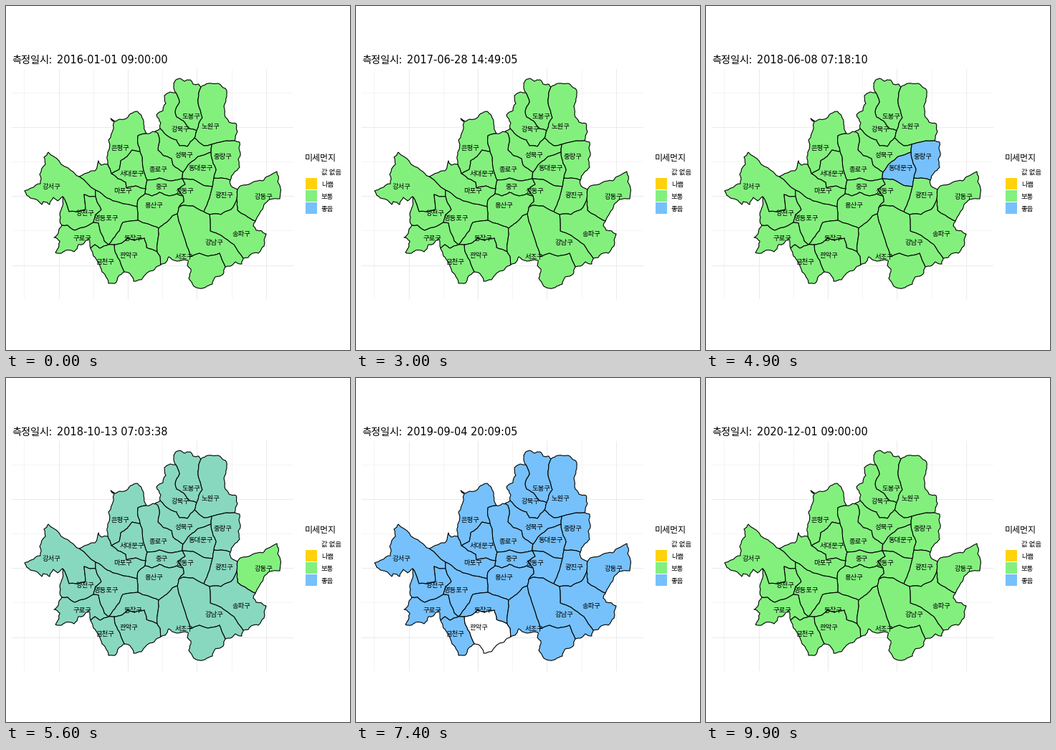
Recreate the animation shown at these times as a matplotlib script. Size 480 px wide and 480 px high, loop 10 s.

```python
import matplotlib.pyplot as plt
import numpy as np
from matplotlib.animation import FuncAnimation
from matplotlib.patches import Polygon, Rectangle

FRAMES, STEP_MS = 100, 100
PX = 0.72  # points per pixel at 100 dpi
KOREAN = "Noto Sans CJK JP"

NONE, BAD, FAIR, GOOD = "#FFFFFF", "#FFD20C", "#83F07E", "#76C1FB"

plt.rcParams["font.family"] = [KOREAN, "DejaVu Sans"]
rng = np.random.default_rng(25)


# ---- borders, each drawn once and shared by its two districts ----

edges = {}


def edge(name, *xy, rough=0.07):
    pts = np.array(xy, float).reshape(-1, 2)
    for _ in range(2):
        seg = np.diff(pts, axis=0)
        normal = np.column_stack([-seg[:, 1], seg[:, 0]])
        mid = pts[:-1] + seg / 2 + normal * rng.uniform(-rough, rough, (len(seg), 1))
        out = np.empty((len(pts) + len(mid), 2))
        out[::2], out[1::2] = pts, mid
        pts = out
    edges[name] = pts


def coast(name, *xy):
    edge(name, *xy, rough=0.13)


# outer borders, clockwise
coast("dobong", 237, 121, 234, 112, 236, 104, 242, 101, 249, 105, 257, 103,
      261, 109, 269, 109, 272, 113)
coast("nowon", 272, 113, 282, 108, 296, 108, 306, 115, 308, 126, 304, 140,
      306, 155, 311, 162, 321, 164, 323, 175, 319, 188)
coast("jungnang", 319, 188, 326, 190, 327, 205, 324, 214, 326, 225, 318, 233, 313, 243)
coast("gwangjin", 313, 243, 314, 251, 323, 256)
coast("gangdong", 323, 256, 327, 251, 344, 246, 358, 244, 367, 237, 378, 231,
      379, 245, 382, 269, 368, 270, 360, 277, 354, 289, 348, 300)
coast("songpa", 348, 300, 345, 307, 349, 313, 357, 314, 363, 318, 360, 335,
      352, 345, 342, 346, 338, 351, 331, 352)
coast("gangnam", 331, 352, 329, 360, 320, 357, 313, 363, 306, 364)
coast("seocho", 306, 364, 303, 374, 292, 378, 288, 388, 280, 391, 270, 394,
      262, 391, 255, 380, 258, 367, 253, 362, 254, 355, 245, 355, 232, 354,
      227, 350, 222, 359, 216, 361)
coast("gwanak", 216, 361, 207, 368, 196, 373, 189, 382, 178, 384, 174, 375, 165, 371)
coast("geumcheon", 165, 371, 157, 377, 152, 387, 143, 387, 139, 377, 134, 371,
      129, 358, 122, 349, 118, 338)
coast("guro", 118, 338, 116, 325, 108, 332, 101, 333, 95, 343, 83, 341, 77, 345,
      69, 344, 74, 334, 75, 328, 67, 323, 73, 317, 78, 306)
coast("yangcheon", 78, 306, 75, 291, 79, 279, 79, 266)
coast("gangseo", 79, 266, 72, 272, 66, 267, 61, 277, 52, 273, 50, 277, 42, 270,
      34, 268, 26, 258, 35, 254, 48, 248, 47, 235, 55, 221, 53, 211, 59, 204,
      74, 216, 90, 229, 102, 238)
coast("mapo", 102, 238, 113, 233, 124, 230, 129, 216, 133, 222, 142, 221)
coast("eunpyeong", 142, 221, 141, 210, 144, 200, 143, 187, 150, 171, 151, 162,
      146, 157, 153, 161, 165, 158, 174, 150, 183, 147, 189, 153, 192, 164, 196, 178)
coast("jongno", 196, 178, 205, 175, 212, 178)
coast("seongbuk", 212, 178, 208, 175, 215, 171)
coast("gangbuk", 215, 171, 216, 163, 210, 152, 219, 146, 223, 136, 221, 125,
      229, 120, 237, 121)

# inner borders
edge("gangbuk_dobong", 237, 121, 242, 134, 236, 147, 238, 155, 247, 160, 256, 171, 266, 174)
edge("dobong_nowon", 272, 113, 268, 130, 271, 145, 274, 156, 269, 164, 266, 174)
edge("gangbuk_nowon", 266, 174, 263, 184)
edge("gangbuk_seongbuk", 215, 171, 228, 183, 238, 187, 242, 195, 253, 196, 263, 184)
edge("nowon_seongbuk", 263, 184, 276, 195, 287, 193)
edge("nowon_jungnang", 287, 193, 303, 189, 319, 188)
edge("seongbuk_jungnang", 287, 193, 286, 204)
edge("jungnang_ddm", 286, 204, 289, 220, 293, 228, 290, 240)
edge("seongbuk_ddm", 286, 204, 268, 210, 257, 219, 247, 232)
edge("seongbuk_jongno", 212, 178, 214, 190, 212, 201, 220, 209, 231, 213, 233, 222, 247, 232)
edge("jongno_ddm", 247, 232, 246, 241)
edge("jungnang_gwangjin", 290, 240, 300, 240, 313, 243)
edge("ddm_gwangjin", 290, 240, 288, 252)
edge("ddm_seongdong", 246, 241, 261, 242, 275, 250, 288, 252)
edge("eunpyeong_jongno", 196, 178, 184, 181, 184, 192, 187, 203)
edge("eunpyeong_sdm", 187, 203, 176, 201, 169, 210, 160, 216, 158, 228, 147, 234)
edge("eunpyeong_mapo", 142, 221, 147, 234)
edge("sdm_mapo", 147, 234, 156, 241, 167, 246, 168, 254, 181, 251, 195, 255)
edge("sdm_jongno", 187, 203, 190, 215, 192, 230, 197, 243)
edge("sdm_jung", 197, 243, 195, 255)
edge("jongno_jung", 197, 243, 214, 240, 232, 244, 246, 241)
edge("jung_seongdong", 246, 241, 250, 249, 240, 256, 247, 265)
edge("mapo_jung", 195, 255, 194, 262)
edge("jung_yongsan", 194, 262, 204, 265, 214, 260, 228, 265, 238, 262, 247, 265)
edge("yongsan_seongdong", 247, 265, 248, 273, 241, 281)
edge("mapo_yongsan", 194, 262, 184, 271, 183, 280)
edge("gangseo_mapo", 102, 238, 125, 257)
edge("mapo_ydp", 125, 257, 141, 268, 158, 274, 183, 280)
edge("ydp_yongsan", 183, 280, 184, 299)
edge("yongsan_dongjak", 184, 299, 198, 304, 213, 310)
edge("yongsan_seocho", 213, 310, 224, 302, 232, 293, 239, 290)
edge("yongsan_gangnam", 239, 290, 241, 281)
edge("seongdong_gangnam", 241, 281, 247, 278, 261, 279, 276, 287, rough=0.04)
edge("seongdong_gwangjin", 288, 252, 284, 268, 276, 287, rough=0.03)
edge("gwangjin_gangnam", 276, 287, 284, 291)
edge("gwangjin_songpa", 284, 291, 300, 291, 314, 284, 322, 270)
edge("gwangjin_gangdong", 322, 270, 323, 256)
edge("gangdong_songpa", 322, 270, 323, 285, 334, 292, 348, 300)
edge("gangnam_songpa", 284, 291, 285, 314, 300, 320, 318, 333, 331, 352, rough=0.03)
edge("gangnam_seocho", 239, 290, 245, 312, 251, 330, 257, 350, 270, 345, 282, 349,
     298, 345, 306, 364, rough=0.04)
edge("dongjak_seocho", 213, 310, 212, 326, 211, 343)
edge("gwanak_seocho", 211, 343, 215, 349, 216, 361)
edge("dongjak_gwanak", 151, 333, 163, 330, 170, 324, 179, 327, 193, 324, 196, 337, 211, 343)
edge("ydp_dongjak", 184, 299, 163, 302, 158, 314, 152, 322, 143, 333)
edge("dongjak_geumcheon", 143, 333, 151, 333)
edge("gwanak_geumcheon", 151, 333, 153, 345, 159, 356, 165, 371)
edge("guro_geumcheon", 118, 338, 124, 333, 131, 338, 143, 333)
edge("ydp_guro", 122, 302, 129, 303, 132, 316, 137, 328, 143, 333)
edge("yangcheon_ydp", 125, 266, 128, 275, 133, 284, 125, 291, 122, 302)
edge("yangcheon_guro", 78, 306, 86, 306, 96, 313, 108, 309, 122, 302)
edge("gangseo_ydp", 125, 257, 125, 266)
edge("gangseo_yangcheon", 79, 266, 84, 275, 88, 287, 100, 287, 111, 284, 109, 263,
     117, 266, 125, 266)

# name, label x, label y, key used in the border names
DISTRICTS = [
    ("도봉구", 258, 153, "dobong"), ("노원구", 285, 167, "nowon"),
    ("강북구", 243, 171, "gangbuk"), ("은평구", 159, 198, "eunpyeong"),
    ("성북구", 248, 207, "seongbuk"), ("중랑구", 302, 209, "jungnang"),
    ("종로구", 212, 228, "jongno"), ("동대문구", 272, 225, "ddm"),
    ("서대문구", 176, 233, "sdm"), ("중구", 217, 252, "jung"),
    ("성동구", 249, 258, "seongdong"), ("광진구", 305, 264, "gwangjin"),
    ("강동구", 359, 265, "gangdong"), ("마포구", 163, 258, "mapo"),
    ("용산구", 206, 278, "yongsan"), ("강서구", 63, 252, "gangseo"),
    ("양천구", 110, 288, "yangcheon"), ("영등포구", 140, 296, "ydp"),
    ("송파구", 328, 317, "songpa"), ("동작구", 177, 323, "dongjak"),
    ("강남구", 290, 329, "gangnam"), ("구로구", 106, 324, "guro"),
    ("관악구", 172, 347, "gwanak"), ("서초구", 249, 350, "seocho"),
    ("금천구", 138, 356, "geumcheon"),
]


def outline(key):
    """Chain every border that mentions the district into one ring."""
    parts = [p for n, p in edges.items() if key in n.split("_")]
    ring = parts.pop(0)
    while parts:
        ends = [(np.hypot(*(p[e] - ring[-1])), i, e)
                for i, p in enumerate(parts) for e in (0, -1)]
        _, i, e = min(ends)
        part = parts.pop(i)
        ring = np.vstack([ring, part if e == 0 else part[::-1]])
    return ring


# ---- monthly grades ----

MONTHS = np.arange("2016-01", "2021-01", dtype="datetime64[M]")
TIMES = MONTHS.astype("datetime64[s]") + np.timedelta64(9, "h")
SPAN = int((TIMES[-1] - TIMES[0]).astype(int))
KEYS = np.round((TIMES - TIMES[0]).astype(int) / SPAN * (FRAMES - 1)).astype(int)

CLEAN = ("2017-08 2017-10 2018-07 2018-08 2018-09 2018-10 2019-07 2019-08 "
         "2019-09 2019-10 2020-07 2020-08 2020-09").split()
SPECIAL = {
    "2016-07": {GOOD: "songpa"},
    "2017-10": {FAIR: "gangseo yangcheon ydp dongjak seongbuk nowon gangdong",
                NONE: "guro ddm"},
    "2018-06": {GOOD: "ddm jungnang"},
    "2018-10": {FAIR: "gangdong"},
    "2019-04": {NONE: "yongsan"},
    "2019-09": {NONE: "gwanak"},
    "2020-01": {NONE: "gangnam"},
}


def grade(month, key):
    for color, keys in SPECIAL.get(month, {}).items():
        if key in keys.split():
            return color
    return GOOD if month in CLEAN else FAIR


# ---- colour mixing in Lab ----

TO_XYZ = np.array([[0.4124, 0.3576, 0.1805],
                   [0.2126, 0.7152, 0.0722],
                   [0.0193, 0.1192, 0.9505]])
TO_LAB = np.array([[0, 116, 0], [500, -500, 0], [0, 200, -200]])
WHITE = TO_XYZ.sum(axis=1)


def to_lab(color):
    rgb = np.array([int(color[i:i + 2], 16) / 255 for i in (1, 3, 5)])
    lin = np.where(rgb > 0.04045, ((rgb + 0.055) / 1.055) ** 2.4, rgb / 12.92)
    return TO_LAB @ np.cbrt(TO_XYZ @ lin / WHITE)


def mix(a, b, t):
    if a == b or t == 0:
        return a
    if t == 1:
        return b
    lab = (1 - t) * to_lab(a) + t * to_lab(b)
    xyz = np.linalg.solve(TO_LAB, lab) ** 3 * WHITE
    lin = np.clip(np.linalg.solve(TO_XYZ, xyz), 0, 1)
    rgb = np.where(lin > 0.0031308, 1.055 * lin ** (1 / 2.4) - 0.055, 12.92 * lin)
    return tuple(np.clip(rgb, 0, 1))


# ---- stage ----

fig = plt.figure(figsize=(4.8, 4.8), dpi=100, facecolor="white")
ax = fig.add_axes([0, 0, 1, 1])
ax.set(xlim=(0, 480), ylim=(480, 0))
ax.axis("off")


def write(x, y, text, size, **kw):
    kw = {"va": "center_baseline", "color": "black", **kw}
    return ax.text(x, y, text, fontsize=size * PX, **kw)


for i in range(8):
    width = (1.07 if i % 2 else 0.53) * PX
    ax.plot([25.3 + 48.2 * i] * 2, [88, 408], color="#EBEBEB", lw=width, zorder=0)
    if i < 6:
        ax.plot([8, 400], [121 + 48.1 * i] * 2, color="#EBEBEB", lw=width, zorder=0)

shapes = {}
for name, x, y, key in DISTRICTS:
    shapes[key] = ax.add_patch(Polygon(outline(key), fc=FAIR, ec="black",
                                       lw=1.1 * PX, joinstyle="round", zorder=1))
    write(x, y, name, 9.4, ha="center", zorder=2)

write(417, 211, "미세먼지", 12)
for i, (label, color) in enumerate([("값 없음", NONE), ("나쁨", BAD),
                                    ("보통", FAIR), ("좋음", GOOD)]):
    y = 230.5 + 17.3 * i
    ax.add_patch(Rectangle((417.7, y - 8), 16.2, 16, fc=color, ec="none"))
    write(440, y + 0.5, label, 9.4)

write(8, 80, "측정일시:", 14.2, va="baseline")
clock = write(71, 80, "", 14.5, va="baseline", family="DejaVu Sans")


def update(frame):
    now = TIMES[0] + np.timedelta64(SPAN * frame // (FRAMES - 1), "s")
    clock.set_text(str(now).replace("T", " "))
    k = min(np.searchsorted(KEYS, frame, side="right") - 1, len(KEYS) - 2)
    t = (frame - KEYS[k]) / (KEYS[k + 1] - KEYS[k])
    here, after = str(MONTHS[k]), str(MONTHS[k + 1])
    for key, shape in shapes.items():
        shape.set_facecolor(mix(grade(here, key), grade(after, key), t))
    return [clock, *shapes.values()]


anim = FuncAnimation(fig, update, frames=FRAMES, interval=STEP_MS,
                     repeat=True, repeat_delay=0, blit=False)
plt.show()
```
